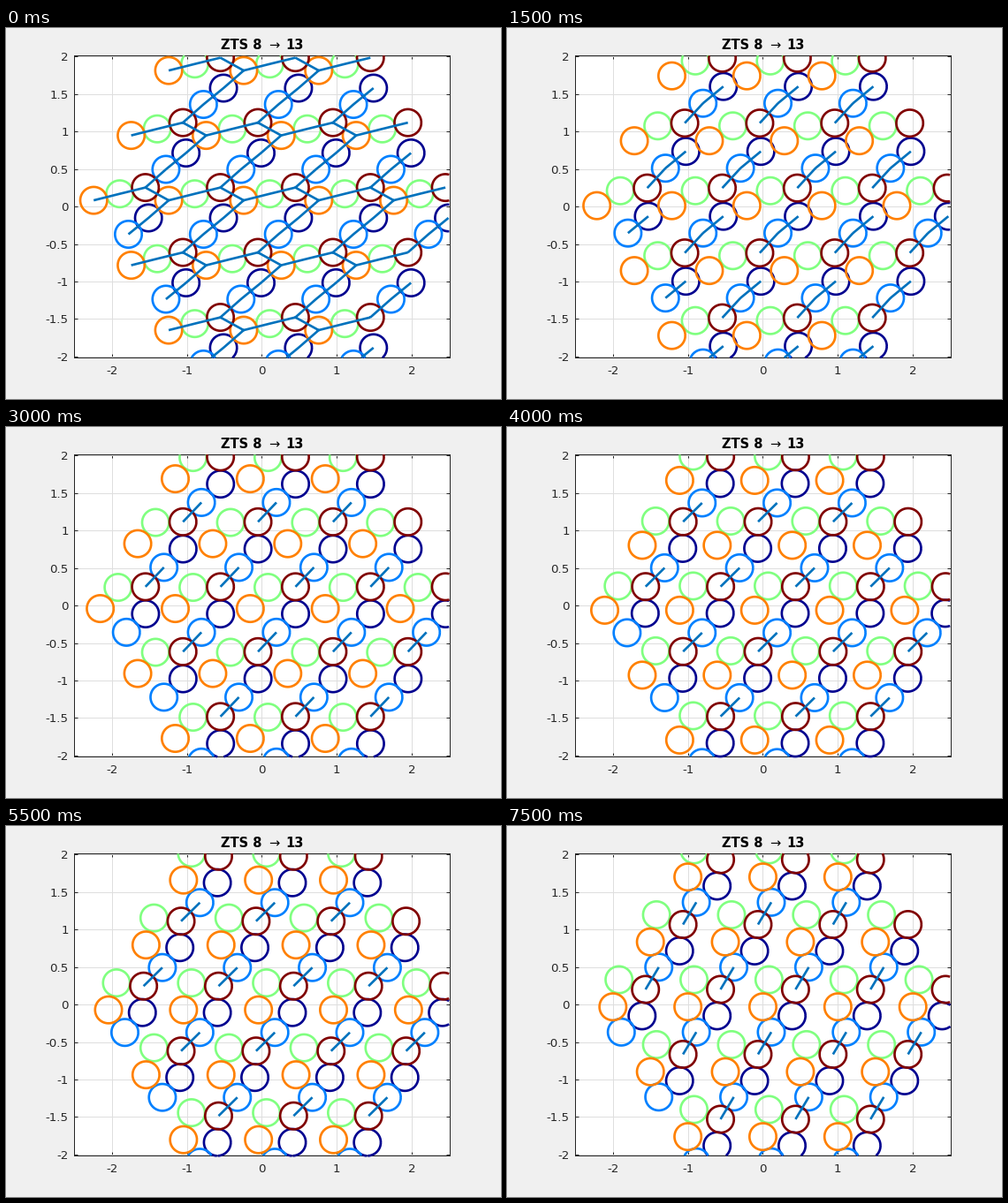
Write a matplotlib script that moves like this. It is 560 by 420 pixels and loops after 8000 ms.

```python
import numpy as np
import matplotlib.pyplot as plt
from matplotlib.animation import FuncAnimation

W, H, DPI = 560, 420, 100
PX = 72 / DPI                      # points per pixel
UNIT = 84.85                       # pixels per data unit
CX, CY = 289.4, 217.8              # data origin, from the lower left corner
XMAX, YMAX = 2.5, 171.15 / UNIT
STEP, FRAMES = 500, 16
END = STEP * (FRAMES - 1)
RADIUS = 15.2 / UNIT
INK = "#262626"

plt.rcParams["font.family"] = "DejaVu Sans"
plt.rcParams["axes.unicode_minus"] = False

COLORS = {"navy": "#00008f", "sky": "#0080ff", "green": "#80ff80",
          "orange": "#ff8000", "red": "#800000"}

# Disk offsets in a cell, in pixels, at four even times; a cubic joins them
KEYS = {
    "navy": [41.5 - 12.8j, 38.9 - 9.8j, 35.2 - 8.7j, 33.1 - 12.7j],
    "green": [9 + 14.5j, 7.6 + 19.8j, 5.4 + 23.8j, 7 + 28.2j],
    "orange": [-20.5 + 7.1j, -14.9 - 2.1j, -5.4 - 6j, 0.1 - 2.5j],
    "red": [38 + 21.6j, 38.5 + 21.2j, 36.2 + 21.3j, 37 + 17.2j],
}
CUBICS = {k: np.polyfit(np.linspace(0, 1, 4), z, 3) for k, z in KEYS.items()}
OFFSET_SUM = 86.8 - 0.9j           # the centre of mass stays put

# Bonds: disk, disk, lattice step to the second disk, time at which it opens
HERE, RIGHT, UP = (0, 0), (1, 0), (0.5, 1)
BONDS = [
    ("orange", "green", HERE, 500),
    ("green", "red", HERE, 500),
    ("red", "orange", RIGHT, 500),
    ("navy", "orange", RIGHT, 500),
    ("sky", "navy", HERE, 2500),
    ("red", "sky", UP, 8000),
]

# Hexagonal patch of a triangular lattice; points are complex numbers
CELLS = [(i - (4 - abs(j)) / 2, j) for j in range(-2, 3) for i in range(5 - abs(j))]
RING = RADIUS * np.exp(1j * np.linspace(0, 2 * np.pi, 241))
SPAN = np.linspace(0, 1, 61)


def point(cell):
    return cell[0] + 1j * cell[1] * np.sqrt(3) / 2


def pose(t):
    """Offset of every disk in its cell; sky balances the other four."""
    pos = {k: np.polyval(c, t / END) for k, c in CUBICS.items()}
    pos["sky"] = OFFSET_SUM - sum(pos.values())
    return {k: z / UNIT for k, z in pos.items()}


def put(line, strokes):
    """Show strokes as one broken line, cut at the axes limits."""
    z = np.concatenate([np.append(s, np.nan) for s in strokes])
    x, y = z.real.copy(), z.imag.copy()
    x[(np.abs(x) > XMAX) | (np.abs(y) > YMAX)] = np.nan
    line.set_data(x, y)


fig = plt.figure(figsize=(W / DPI, H / DPI), dpi=DPI, facecolor="#f0f0f0")
half_w, half_h = XMAX * UNIT, YMAX * UNIT
ax = fig.add_axes([(CX - half_w) / W, (CY - half_h) / H, 2 * half_w / W, 2 * half_h / H])
ax.set(xlim=(-XMAX, XMAX), ylim=(-YMAX, YMAX))
ax.set_xticks(range(-2, 3))
ax.set_yticks(np.arange(-2, 2.5, 0.5))
ax.xaxis.set_major_formatter("{x:g}")
ax.yaxis.set_major_formatter("{x:g}")
ax.set_axisbelow(True)
ax.grid(color="#dedede", lw=PX)
ax.tick_params(direction="in", top=True, right=True, length=4.25 * PX, width=PX,
               color=INK, labelcolor=INK, labelsize=13.33 * PX)
ax.tick_params(axis="x", pad=8.5 * PX)
ax.tick_params(axis="y", pad=6.5 * PX)
for spine in ax.spines.values():
    spine.set(color=INK, linewidth=PX)


def title(x, text, align, weight="bold"):
    fig.text(x / W, 1 - 24 / H, text, ha=align, va="baseline",
             size=14.67 * PX, weight=weight)


title(243, "ZTS 8", "left")
title(303, "\u2192", "center", "normal")
title(337, "13", "right")


def stroke(color, z):
    return ax.plot([], [], color=color, lw=2.67 * PX, zorder=z, clip_on=False,
                   solid_capstyle="butt", solid_joinstyle="round")[0]


rings = {name: stroke(color, 3) for name, color in COLORS.items()}
links = stroke("#0072bd", 4)


def draw(frame):
    t = frame * STEP
    pos = pose(t)
    for name, line in rings.items():
        put(line, [point(c) + pos[name] + RING for c in CELLS])
    strokes = []
    for a, b, (di, dj), end in BONDS:
        for c in CELLS:
            d = (c[0] + di, c[1] + dj)
            if t < end and d in CELLS:
                p, q = point(c) + pos[a], point(d) + pos[b]
                strokes.append(p + (q - p) * SPAN)
    put(links, strokes)
    return [*rings.values(), links]


anim = FuncAnimation(fig, draw, frames=FRAMES, interval=STEP, repeat=True,
                     repeat_delay=0, blit=False)
plt.show()
```
